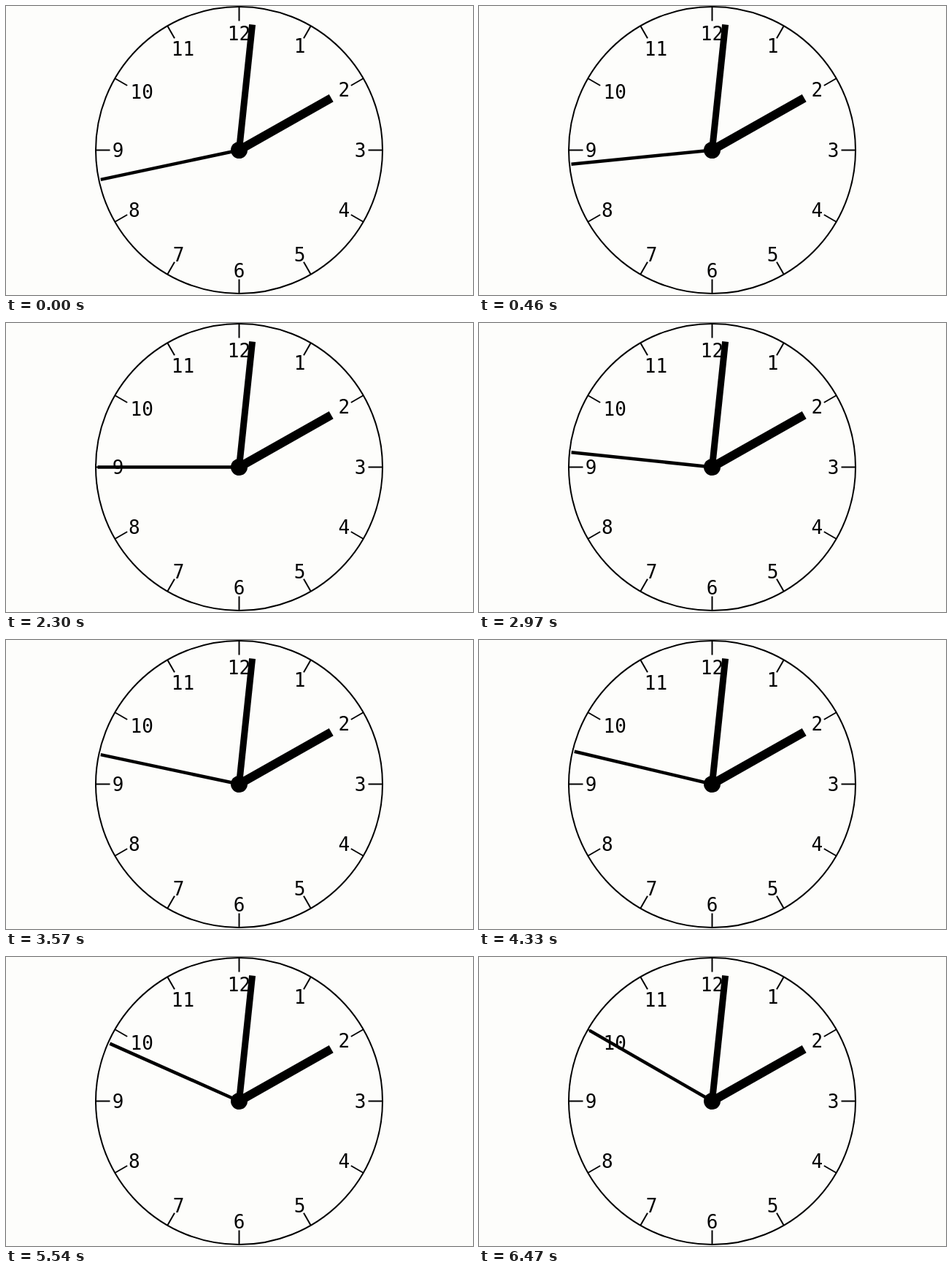
An HTML page that plays this animation: 640 by 396 pixels, repeating every 6.5 s.

```html
<!DOCTYPE html>
<html lang="en">
<head>
<meta charset="utf-8">
<title>Analogue clock</title>
<style>
  html, body { margin: 0; height: 100%; overflow: hidden; background: #fdfdfb; }
  svg { display: block; width: 640px; height: 396px; }
  line { stroke: #000; }
  text { font: 26px "DejaVu Sans Mono", monospace; text-anchor: middle; }
</style>
</head>
<body>
<svg viewBox="-319.5 -197.5 640 396">
  <circle r="196.5" fill="none" stroke="#000" stroke-width="2"/>
  <g id="face"></g>
  <line id="hour" y2="-145" stroke-width="12"/>
  <line id="minute" y2="-173" stroke-width="9"/>
  <line id="second" y2="-194" stroke-width="4.5"/>
  <circle r="11.5"/>
</svg>
<script>
const LOOP = 6500, FRAME = 100 / 3;
const HOUR = 2, MINUTE = 1, SECOND = 43;
const FIRST_TICK = 324, TICK = 1001, SWING = 250;

const byId = id => document.getElementById(id);
const turn = (id, degrees) => byId(id).setAttribute('transform', `rotate(${degrees})`);

// Wider labels sit further inside the rim
function hourMark(hour) {
  const angle = hour * Math.PI / 6, digits = String(hour).length;
  const x = (178 - 12 * digits) * Math.sin(angle);
  const y = -(170 - 5 * digits) * Math.cos(angle);
  return `<line y1="-177" y2="-196.5" stroke-width="2" transform="rotate(${30 * hour})"/>
    <text x="${x}" y="${y + 9.2}">${hour}</text>`;
}

const elastic = u => u >= 1 ? 1 : 1 - 2 ** (-10 * u) * Math.cos(2 * Math.PI * u / 0.3);

function draw() {
  const t = performance.now() % LOOP;
  const elapsed = Math.floor((t + 4) / FRAME) * FRAME - FIRST_TICK; // 30 steps per second
  const ticks = Math.floor(elapsed / TICK);
  turn('second', 6 * (SECOND + ticks + elastic((elapsed - ticks * TICK) / SWING)));
  requestAnimationFrame(draw);
}

byId('face').innerHTML = Array.from({ length: 12 }, (_, i) => hourMark(i + 1)).join('');
turn('hour', 30 * HOUR + MINUTE / 2);
turn('minute', 6 * MINUTE);
draw();
</script>
</body>
</html>
```
